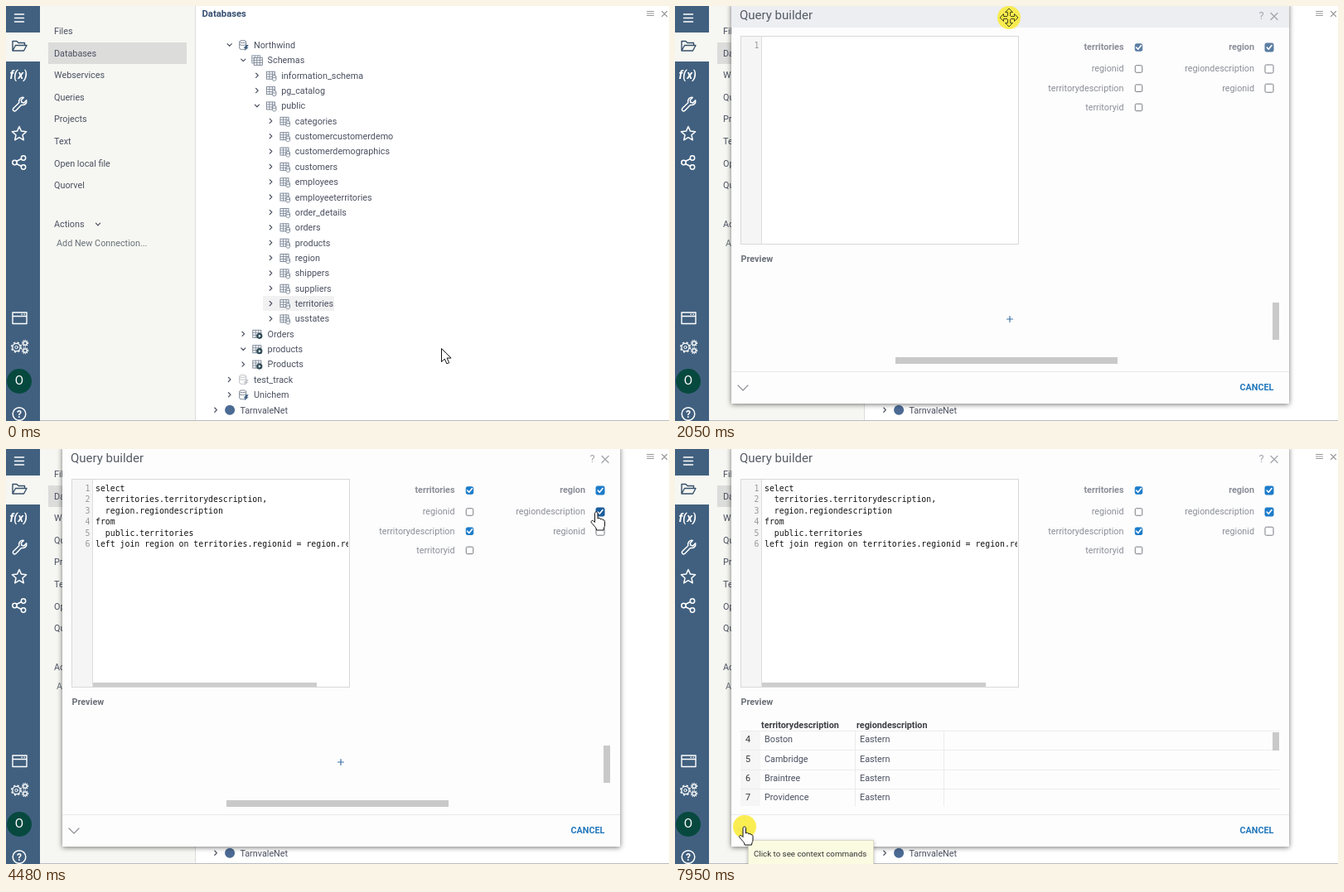
Animation of 800x501 px, one loop 8 s. Source, as an HTML page:

```html
<!DOCTYPE html>
<html lang="en">
<head>
<meta charset="utf-8">
<title>Query builder</title>
<style>
  html, body { margin: 0; width: 100%; height: 100%; overflow: hidden; background: #fff; }
  svg { display: block; width: 100%; height: 100%; }
  text { font: 10.8px Roboto, sans-serif; fill: #4b5060; white-space: pre; }
  .bold { font-weight: 700; }
  .heading { font-size: 11.3px; font-weight: 700; fill: #364f70; }
  .title { font-size: 15px; fill: #555b65; }
  .label { fill: #8b8e98; text-anchor: end; }
  .menu { fill: #45597c; }
  .code { font: 9.83px "DejaVu Sans Mono", monospace; fill: #111; }
  .number { fill: #999; text-anchor: end; }
  .tip { font-size: 9.75px; fill: #333; }
  .line { fill: none; stroke-linecap: round; stroke-linejoin: round; }
  .shadow { filter: drop-shadow(0 1px 3px rgba(0, 0, 0, .55)); }
</style>
</head>
<body>
<svg id="stage" viewBox="0 0 800 501" preserveAspectRatio="none"></svg>
<script>
const LOOP = 8000, STEP = 66;

// Markup helpers; text is placed by its vertical centre.
const text = (x, y, s, cls = '', extra = '') =>
  `<text x="${x}" y="${y + 3.9}" class="${cls}" ${extra}>${s}</text>`;
const rect = (x, y, w, h, fill, extra = '') =>
  `<rect x="${x}" y="${y}" width="${w}" height="${h}" fill="${fill}" ${extra}/>`;
const line = (d, stroke, width = 1, extra = '') =>
  `<path class="line" d="${d}" stroke="${stroke}" stroke-width="${width}" ${extra}/>`;
const at = (x, y, body, extra = '') => `<g transform="translate(${x} ${y})" ${extra}>${body}</g>`;
const group = (id, body) => `<g id="${id}">${body}</g>`;

const chevron = (x, y, open, color = '#4b5060', size = 2.6) =>
  at(x, y, line(open ? `M${-size} ${-size / 2}l${size} ${size} ${size} ${-size}`
                     : `M${-size / 2} ${-size}l${size} ${size} ${-size} ${size}`, color, 1.2));

const cylinder = (w, h, color) =>
  `<path d="M0 1.5v${h}c0 2 ${w} 2 ${w} 0v${-h}" fill="#fff" stroke="${color}"/>
   <ellipse cx="${w / 2}" cy="1.5" rx="${w / 2}" ry="1.5" fill="#fff" stroke="${color}"/>`;

const grid = color =>
  rect(-5.5, -4.5, 10, 9, '#fff', `stroke="${color}"`) +
  line('M-5.5-1.5h10M-5.5 1.5h10M-2-4.5v9M1.5-4.5v9', color, .9);

const treeIcons = {
  db: () => at(-5, -5.5, cylinder(8, 8, '#7b8796')) +
    line('M-5-1c0 2 8 2 8 0', '#7b8796') +
    '<path d="M3 0l-3 4h2l-1 3 5-4H4l2-3z" fill="#3f5f82"/>',
  dim: () => at(-5, -5.5, cylinder(8, 8, '#bcbfc4')) +
    line('M-5-1c0 2 8 2 8 0', '#bcbfc4') + '<path d="M3 0l-3 4h2l-1 3 5-4H4l2-3z" fill="#c3c6cb"/>',
  schemas: () => at(-1, -1, grid('#8d99a8')) + at(1.5, 1.5, grid('#7b8796')),
  table: () => grid('#7f8b9b') + at(1.5, 0, cylinder(4.5, 3.5, '#7b8796')),
  query: () => grid('#7f8b9b') +
    '<circle cx="2.5" cy="2.5" r="3.6" fill="#2d4a55"/><path d="M1.5 .7l3 1.8-3 1.8z" fill="#fff"/>',
  server: () => '<circle r="6" fill="#4b6a94"/>'
};

// Each row: level, icon, name, expanded.
const tables = ('categories customercustomerdemo customerdemographics customers employees ' +
  'employeeterritories order_details orders products region shippers suppliers territories usstates').split(' ');
const rows = [
  [0, 'db', 'Northwind', true], [1, 'schemas', 'Schemas', true],
  [2, 'table', 'information_schema'], [2, 'table', 'pg_catalog'], [2, 'table', 'public', true],
  ...tables.map(name => [3, 'table', name]),
  [1, 'query', 'Orders'], [1, 'query', 'products', true], [1, 'query', 'Products'],
  [0, 'dim', 'test_track'], [0, 'db', 'Unichem'], [-1, 'server', 'TarnvaleNet']
];
const tree = rect(310, 350, 86, 18, '#f1f1f2') + rows.map(([level, icon, name, open], i) => {
  const x = 299 + 16.6 * level, y = 47 + 18.36 * i;
  return chevron(x - 29.3, y, open) + at(x - 12.3, y, treeIcons[icon]()) + text(x, y, name);
}).join('');

const white = (d, width = 1.5) => line(d, '#fff', width);
const gear = (x, y, r) => `<circle cx="${x}" cy="${y}" r="${r}" class="line" stroke="#fff" stroke-width="1.3"/>
  <circle cx="${x}" cy="${y}" r="${r + 1.3}" class="line" stroke="#fff" stroke-width="1.4"
    stroke-dasharray="${r * .5} ${r * .52}" style="stroke-linecap:butt"/>`;
const star = Array.from({ length: 10 }, (_, i) => {
  const r = i % 2 ? 4.2 : 9, a = i * Math.PI / 5;
  return `${(16 + r * Math.sin(a)).toFixed(1)} ${(154.5 - r * Math.cos(a)).toFixed(1)}`;
}).join('L');

const rail = rect(0, 0, 41, 501, '#41607f') + rect(0, 32, 41, 35, '#f6f7f2') +
  white('M10.5 10h11M10.5 14.5h11M10.5 19h11') +
  line('M8 54V42.5h5l2 2h7.5v3M8 54l3.5-6.5H25L21.5 54z', '#37506c', 1.4) +
  text(4.5, 84, 'f(x)', 'bold', 'style="font-size:14px;font-style:italic;fill:#fff"') +
  white('M8.8 123.5l7-6.8c-1-4 2-7 5.5-6.2l-3 3 .6 2.8 2.8.6 3-3c.8 3.5-2.2 6.5-6.2 5.5l-6.8 7c-2 1.5-4.4-1-2.9-2.9z') +
  white(`M${star}z`) +
  white('M12.5 187.5l6-3M12.5 190.5l6 3') +
  [[10.5, 189], [21, 183.5], [21, 194.5]].map(([x, y]) =>
    `<circle cx="${x}" cy="${y}" r="2.7" class="line" stroke="#fff" stroke-width="1.5"/>`).join('') +
  white('M8 370h17v13.5H8zM8 374.5h17M19 372.3h.3M22 372.3h.3', 1.4) +
  gear(12.5, 412, 4.6) + gear(23, 407, 2.2) + gear(23, 416, 2.2) +
  '<circle cx="12.5" cy="412" r="1.7" class="line" stroke="#fff"/>' +
  '<circle cx="16" cy="453" r="15" fill="#07493f"/>' +
  text(16, 453.5, 'O', '', 'style="font-size:15px;fill:#fff;text-anchor:middle"') +
  '<circle cx="16" cy="492.5" r="7.8" class="line" stroke="#fff" stroke-width="1.5"/>' +
  text(16, 493, '?', 'bold', 'style="fill:#fff;text-anchor:middle;font-size:12px"');

const panel = rect(41, 0, 187.5, 501, '#f6f7f2') + rect(228, 0, 1, 501, '#dcdcdc') +
  rect(51, 44, 167, 26, '#dcdcdb') +
  ['Files', 'Databases', 'Webservices', 'Queries', 'Projects', 'Text', 'Open local file', 'Quorvel']
    .map((s, i) => text(58, 30 + 26.6 * i, s)).join('') +
  text(58, 263, 'Actions') + chevron(111, 263.5, true) +
  text(61, 286.5, 'Add New Connection...', '', 'style="fill:#697078"');

const header = text(236.5, 9.5, 'Databases', 'heading') +
  line('M773.5 6.5h8M773.5 9h8M773.5 11.5h8', '#999') + line('M791.5 6.5l6 6M797.5 6.5l-6 6', '#999', 1.2);

const menuItems = ['Get All', 'Get Top 100', 'New SQL Query...', 'Build Query...', 'Visual Query...'];
const menu = rect(349.5, 355.5, 151, 110, '#eceff2', 'stroke="#c9cdd2" style="filter:drop-shadow(0 1px 2px #0005)"') +
  rect(350, 0, 150, 20, '#d7dde5', 'id="menuHover"') +
  menuItems.map((s, i) => text(372, 370 + 20 * i, s, 'menu')).join('');

const box = (id, x, y, size) =>
  `<g id="${id}">` + rect(x - size / 2, y - size / 2, size, size, '#fff', 'rx="1.5" stroke="#777a80"') +
  line(`M${x - 2.8} ${y}l2 2.2 3.8-4.6`, '#fff', 1.6, 'visibility="hidden"') + '</g>';
const column = (name, fields, x, boxX, size) =>
  text(x, 49.5, name, 'label bold') + box(name, boxX, 50, size) +
  fields.map((f, i) => text(x, 75.5 + 23.3 * i, f, 'label') +
    box(`${name}-${f}`, boxX, 76 + 23.2 * i, size)).join('');

const codeLine = (i, s) => text(101.5, 47 + 13.45 * i, i + 1, 'code number') +
  text(108, 47 + 13.45 * i, s, 'code');
const code = fields => ['select', ...fields.map((f, i) => `  ${f}${i < fields.length - 1 ? ',' : ''}`),
  'from', '  public.territories', 'left join region on territories.regionid = region.regionid']
  .map((s, i) => codeLine(i, s)).join('') + rect(105, 282, 270, 5.5, '#cdcdcd');

const cities = ['Boston', 'Cambridge', 'Braintree', 'Providence'];
const rowY = i => 350.5 + 23.35 * i;
const results = rect(79, 340, 24, 91, '#f6f6f7') +
  line('M79 340.5H729M79 363.5H729M79 387.5H729M79 410.5H729M217.5 340V431', '#ececee') +
  text(104, 333, 'territorydescription', 'bold', 'style="fill:#3c3e44"') +
  cities.map((s, i) => text(85, rowY(i), i + 4, '', 'style="fill:#333"') + text(108, rowY(i), s)).join('') +
  rect(721, 342, 8, 22, '#c9c9c9');
const regions = text(219, 333, 'regiondescription', 'bold', 'style="fill:#3c3e44"') +
  line('M324.5 340V431', '#ececee') + cities.map((_, i) => text(223, rowY(i), 'Eastern')).join('');

const dialog = rect(68, -3.5, 673, 483.5, '#fdfdfd', 'class="shadow"') +
  rect(68, -3, 673, 29, '#eceef2', 'id="titleBand"') +
  text(78, 12.3, 'Query builder', 'title') +
  text(704.5, 12.5, '?', '', 'style="font-size:13px;fill:#a2a5ab"') +
  line('M719 8.5l8 8M727 8.5l-8 8', '#a2a5ab', 1.3) +
  rect(79.5, 36.5, 335, 251, '#fff', 'stroke="#d9d9d9"') + rect(80, 37, 24.5, 250, '#f5f5f5') +
  rect(104, 37, 1, 250, '#dedede') +
  `<g clip-path="url(#editor)">` +
    group('codeEmpty', text(101.5, 47, 1, 'code number')) +
    group('codeOne', code(['territories.territorydescription'])) +
    group('codeTwo', code(['territories.territorydescription', 'region.regiondescription'])) + '</g>' +
  column('territories', ['regionid', 'territorydescription', 'territoryid'], 541.5, 559.5, 8.5) +
  column('region', ['regiondescription', 'regionid'], 699, 717, 10) +
  text(79.5, 305, 'Preview', 'bold', 'style="fill:#6c7079"') +
  group('noResults', line('M400.5 378h7M404 374.5v7', '#3d72a8', 1.2) +
    rect(266, 424, 268, 8, '#c9c9c9') + rect(721, 358, 8, 45, '#c9c9c9')) +
  group('results', results) + group('regions', regions) +
  rect(68, 441, 673, 1, '#e9e9eb') + chevron(82, 461, true, '#8e9198', 6) +
  text(681.5, 460, 'CANCEL', 'bold', 'style="fill:#2277bb"');

const tooltip = rect(88.5, 472.5, 151, 32, '#fbfbe2', 'stroke="#dcdccb" style="filter:drop-shadow(0 1px 2px #0004)"') +
  text(95, 488, 'Click to see context commands', 'tip');

const pointerShape = (id, d) => `<path id="${id}" d="${d}" fill="#fff" stroke="#111" stroke-linejoin="round"/>`;
const arm = [0, 90, 180, 270].map(a =>
  `<path transform="rotate(${a})" d="M-1.5-2V-6.5H-4.5L0-11 4.5-6.5H1.5V-2"/>`).join('');
const cursor = '<circle id="click" r="14" fill="#f9ea3a" fill-opacity=".88"/>' +
  pointerShape('arrow', 'M.5.5V16.5l3.8-3.4 2.6 5.8 2.8-1.2-2.6-5.7h5z') +
  pointerShape('hand', 'M-2 1.5C-2-.5 1.5-.5 1.5 1.5V8C2.5 6.8 5 7.2 5 9 6 8 8 8.5 8 10 9 9.3 10 10 10 11.5V16C10 18 8.5 19 8.5 22H0C0 19-2 18-6 13-7.5 11-5 9.5-3.5 11L-2 12.5Z') +
  `<g id="mover" fill="#f9ea3a" stroke="#4d4a20">${arm}</g>`;

document.getElementById('stage').innerHTML =
  '<clipPath id="editor"><rect x="80" y="37" width="333" height="250.5"/></clipPath>' +
  rect(0, 0, 800, 501, '#fff') + panel + header + tree + rect(41, 500, 759, 1, '#b9bcc0') + rail +
  group('menu', menu) + group('dialog', dialog) + group('tooltip', tooltip) + group('cursor', cursor);

const $ = id => document.getElementById(id);
const show = (id, on) => $(id).setAttribute('visibility', on ? 'visible' : 'hidden');
const place = (id, x, y) => $(id).setAttribute('transform', `translate(${x} ${y})`);

const smooth = p => p * p * (3 - 2 * p);
const easeIn = p => p * p;
const easeOut = p => p * (2 - p);

// Pointer moves: start, end, x, y, easing.
const moves = [
  [70, 480, 349, 356], [620, 820, 371, 409], [890, 891, 371, 429],
  [1370, 1720, 464, 62], [1980, 2110, 403, 14],
  [2230, 2590, 487, 77, easeIn], [2590, 2860, 558.5, 98, easeOut],
  [3560, 4090, 712.5, 76], [4610, 5130, 467, 465], [7220, 7690, 84, 456]
];
const clicks = [[480, 620], [1780, 2110], [3300, 3490], [4350, 4480], [7880, LOOP]];
const inside = (t, [from, to]) => t >= from && t < to;

function pointerAt(t) {
  let x = 525, y = 413;
  for (const [start, end, toX, toY, ease = smooth] of moves) {
    if (t < start) break;
    const held = (Math.floor((t - start) / STEP) + 1) * STEP;
    const p = ease(Math.min(1, held / (end - start)));
    x += (toX - x) * p;
    y += (toY - y) * p;
  }
  return [x, y];
}

function setBox(id, checked, color = '#1d7cca', border = '#777a80') {
  const [square, tick] = $(id).children;
  square.setAttribute('fill', checked ? color : '#fff');
  square.setAttribute('stroke', checked ? color : border);
  tick.setAttribute('visibility', checked ? 'inherit' : 'hidden');
}

function draw(t) {
  const [x, y] = pointerAt(t);
  place('cursor', x, y);

  const hoverRow = Math.floor((y - 360.5) / 20);
  show('menu', inside(t, [620, 1160]));
  show('menuHover', inside(t, [620, 1160]) && hoverRow >= 0);
  $('menuHover').setAttribute('y', 360.5 + 20 * hoverRow);

  const open = t >= 1160, dragged = t >= 1980;
  $('dialog').style.display = open ? '' : 'none';
  if (dragged && t < 2150) place('dialog', x - 403, y - 14);
  else place('dialog', dragged ? 0 : 61, dragged ? 0 : 48);

  const moving = inside(t, [1700, 2130]);
  show('titleBand', moving);
  show('mover', moving);
  const hand = inside(t, [2850, 3620]) || inside(t, [3970, 4670]) || t >= 7620;
  show('hand', hand);
  show('arrow', !hand && !moving);
  show('click', clicks.some(span => inside(t, span)));

  const first = t >= 3430, second = t >= 4480;
  const accent = t < 2230 ? '#5b7da3' : '#1d7cca';
  setBox('territories', true, accent);
  setBox('region', true, accent);
  setBox('territories-regionid', false, '', inside(t, [2520, 2780]) ? '#333' : '#777a80');
  setBox('territories-territorydescription', first);
  setBox('region-regiondescription', second, t < 4670 ? '#1a5d9c' : '#1d7cca');
  show('codeEmpty', !first);
  show('codeOne', first && !second);
  show('codeTwo', second);

  show('noResults', t < 5860);
  show('results', t >= 5860);
  show('regions', t >= 6690);
  show('tooltip', t >= 7880);
}

function frame() {
  draw(performance.now() % LOOP);
  requestAnimationFrame(frame);
}
frame();
</script>
</body>
</html>
```
